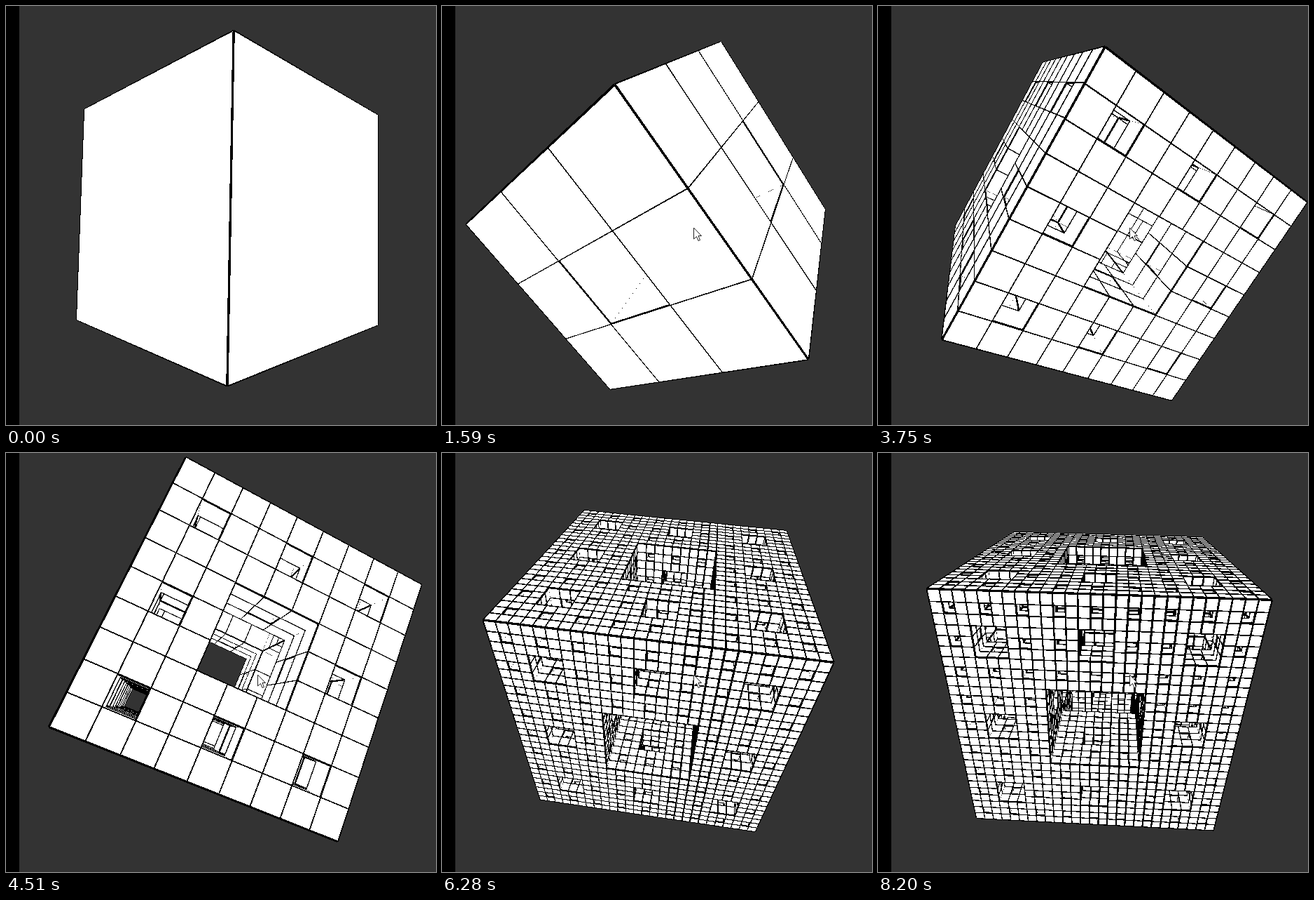
These frames come from a looping animation (614x597 px, 8280 ms). An HTML page with a canvas:

```html
<!DOCTYPE html>
<html lang="en">
<head>
<meta charset="utf-8">
<title>Menger sponge</title>
<style>
  html, body { margin: 0; width: 100%; height: 100%; overflow: hidden; background: #333; }
  canvas { display: block; }
</style>
</head>
<body>
<canvas id="stage" width="614" height="597"></canvas>
<script>
const W = 614, H = 597, LEFT = 19;
const CX = 319, CY = 299, SIZE = 300;
const CAMERA = 300 / Math.tan(Math.PI / 6);
const STROKE = 2;
const LINE_BIAS = 1.0001;
const LOOP = 8280;
const WHITE = 0xffffffff, BLACK = 0xff000000, GREY = 0xff333333;

const ctx = document.getElementById('stage').getContext('2d');
const image = ctx.createImageData(W, H);
const pixels = new Uint32Array(image.data.buffer);
const depth = new Float32Array(W * H);

function isSolid(p, cells) {
  if (p.some(v => v < 0 || v >= cells)) return false;
  let [x, y, z] = p;
  for (let n = cells; n > 1; n /= 3) {
    if ((x % 3 === 1) + (y % 3 === 1) + (z % 3 === 1) > 1) return false;
    x = Math.floor(x / 3);
    y = Math.floor(y / 3);
    z = Math.floor(z / 3);
  }
  return true;
}

function buildSponge(level) {
  const cells = 3 ** level, m = cells + 1;
  const strides = [1, m, m * m], faces = [];
  for (let z = 0; z < cells; z++)
    for (let y = 0; y < cells; y++)
      for (let x = 0; x < cells; x++) {
        const p = [x, y, z];
        if (!isSolid(p, cells)) continue;
        for (let axis = 0; axis < 3; axis++)
          for (const sign of [-1, 1]) {
            const next = p.slice();
            next[axis] += sign;
            if (isSolid(next, cells)) continue;
            const corner = p.slice();
            if (sign > 0) corner[axis]++;
            faces.push({
              axis, sign,
              base: corner[0] + corner[1] * m + corner[2] * m * m,
              offset: sign * (corner[axis] / cells - 0.5) * SIZE
            });
          }
      }
  const count = m ** 3;
  return {
    cells, m, strides, faces,
    sx: new Float64Array(count), sy: new Float64Array(count), sw: new Float64Array(count),
    drawn: new Uint8Array(count * 3)
  };
}

const sponges = [0, 1, 2, 3].map(buildSponge);

// Object axes in view space for rotateX(a), rotateY(0.4a), rotateZ(0.1a)
function viewAxes(a) {
  const sa = Math.sin(a), ca = Math.cos(a);
  const sb = Math.sin(a * 0.4), cb = Math.cos(a * 0.4);
  const sc = Math.sin(a * 0.1), cc = Math.cos(a * 0.1);
  return [
    [cb * cc, ca * sc + sa * sb * cc, sa * sc - ca * sb * cc],
    [-cb * sc, ca * cc - sa * sb * sc, sa * cc + ca * sb * sc],
    [sb, -cb * sa, cb * ca]
  ];
}

function project(s, axes) {
  const { cells, m } = s, [ex, ey, ez] = axes;
  const at = n => (n / cells - 0.5) * SIZE;
  let i = 0;
  for (let z = 0; z < m; z++)
    for (let y = 0; y < m; y++)
      for (let x = 0; x < m; x++, i++) {
        const px = at(x), py = at(y), pz = at(z);
        const w = 1 / (CAMERA - (px * ex[2] + py * ey[2] + pz * ez[2]));
        s.sw[i] = w;
        s.sx[i] = CX + (px * ex[0] + py * ey[0] + pz * ez[0]) * CAMERA * w;
        s.sy[i] = CY + (px * ex[1] + py * ey[1] + pz * ez[1]) * CAMERA * w;
      }
}

const qx = new Float64Array(4), qy = new Float64Array(4);

function setCorner(i, x, y) {
  qx[i] = x;
  qy[i] = y;
}

// Fills the current quad; inverse depth at a pixel is A * x + B * y + C
function fillQuad(A, B, C, color) {
  const top = Math.max(0, Math.ceil(Math.min(qy[0], qy[1], qy[2], qy[3]) - 0.5));
  const bottom = Math.min(H - 1, Math.ceil(Math.max(qy[0], qy[1], qy[2], qy[3]) - 0.5) - 1);
  for (let row = top; row <= bottom; row++) {
    const y = row + 0.5;
    let left = Infinity, right = -Infinity;
    for (let i = 0; i < 4; i++) {
      const j = (i + 1) & 3;
      if ((qy[i] <= y) === (qy[j] <= y)) continue;
      const x = qx[i] + (y - qy[i]) / (qy[j] - qy[i]) * (qx[j] - qx[i]);
      if (x < left) left = x;
      if (x > right) right = x;
    }
    const from = Math.max(LEFT, Math.ceil(left - 0.5));
    const to = Math.min(W - 1, Math.ceil(right - 0.5) - 1);
    const rowDepth = B * y + C;
    for (let col = from, k = row * W + from; col <= to; col++, k++) {
      const w = A * (col + 0.5) + rowDepth;
      if (w > depth[k]) {
        depth[k] = w;
        pixels[k] = color;
      }
    }
  }
}

function drawFace(s, face, axes) {
  const u = s.strides[(face.axis + 1) % 3], v = s.strides[(face.axis + 2) % 3];
  [face.base, face.base + u, face.base + u + v, face.base + v]
    .forEach((n, i) => setCorner(i, s.sx[n], s.sy[n]));
  const [nx, ny, nz] = axes[face.axis].map(c => c * face.sign);
  const scale = 1 / (face.offset - nz * CAMERA);
  const A = nx * scale / CAMERA, B = ny * scale / CAMERA;
  fillQuad(A, B, -nz * scale - A * CX - B * CY, WHITE);
}

function drawEdge(s, start, axis) {
  const key = start * 3 + axis;
  if (s.drawn[key]) return;
  s.drawn[key] = 1;
  const end = start + s.strides[axis];
  const x0 = s.sx[start], y0 = s.sy[start], w0 = s.sw[start];
  const x1 = s.sx[end], y1 = s.sy[end], w1 = s.sw[end];
  const dx = x1 - x0, dy = y1 - y0, len2 = dx * dx + dy * dy;
  if (len2 < 1e-6) return;
  const half = STROKE / 2 * CAMERA / Math.sqrt(len2);
  const h0 = half * w0, h1 = half * w1;
  setCorner(0, x0 - dy * h0, y0 + dx * h0);
  setCorner(1, x1 - dy * h1, y1 + dx * h1);
  setCorner(2, x1 + dy * h1, y1 - dx * h1);
  setCorner(3, x0 + dy * h0, y0 - dx * h0);
  const slope = (w1 - w0) / len2 * LINE_BIAS;
  const A = dx * slope, B = dy * slope;
  fillQuad(A, B, w0 * LINE_BIAS - A * x0 - B * y0, BLACK);
}

function drawSponge(s, angle) {
  const axes = viewAxes(angle);
  project(s, axes);
  s.drawn.fill(0);
  const visible = s.faces.filter(f => axes[f.axis][2] * f.sign * CAMERA > f.offset);
  for (const face of visible) drawFace(s, face, axes);
  for (const { axis, base } of visible) {
    const u = (axis + 1) % 3, v = (axis + 2) % 3;
    drawEdge(s, base, u);
    drawEdge(s, base + s.strides[v], u);
    drawEdge(s, base, v);
    drawEdge(s, base + s.strides[u], v);
  }
}

function drawCursor() {
  const points = [[0, 0], [0, 16], [4, 12.5], [6.5, 18.5], [9, 17.5], [6.5, 11.5], [11, 11.5]];
  ctx.beginPath();
  for (const [x, y] of points) ctx.lineTo(359.5 + x, 316 + y);
  ctx.closePath();
  ctx.fillStyle = '#fff';
  ctx.strokeStyle = '#222';
  ctx.lineWidth = 1;
  ctx.fill();
  ctx.stroke();
}

const CLICKS = [12, 30, 75];
const STALLS = [78, 84, 94, 103];
const CURSOR_IN = 6;

// Steady spin at first; the finest sponge slows it to 0.01 rad per step
function angleAt(step) {
  if (step < CLICKS[2]) return 7.9 + 0.01 * Math.max(0, Math.floor(4.675 * step - 0.3));
  return 11.4 + 0.01 * (step - 77 - STALLS.filter(n => n <= step).length);
}

function draw(step) {
  depth.fill(0);
  pixels.fill(GREY);
  for (let y = 0; y < H; y++) pixels.fill(BLACK, y * W, y * W + LEFT);
  drawSponge(sponges[CLICKS.filter(n => n <= step).length], angleAt(step));
  ctx.putImageData(image, 0, 0);
  if (step >= CURSOR_IN) drawCursor();
}

const startTime = performance.now();
let shown = -1;

function tick() {
  const t = (performance.now() - startTime) % LOOP;
  const step = Math.min(107, Math.floor((t + 27) / 76.83));
  if (step !== shown) draw(shown = step);
  requestAnimationFrame(tick);
}
tick();
</script>
</body>
</html>
```
